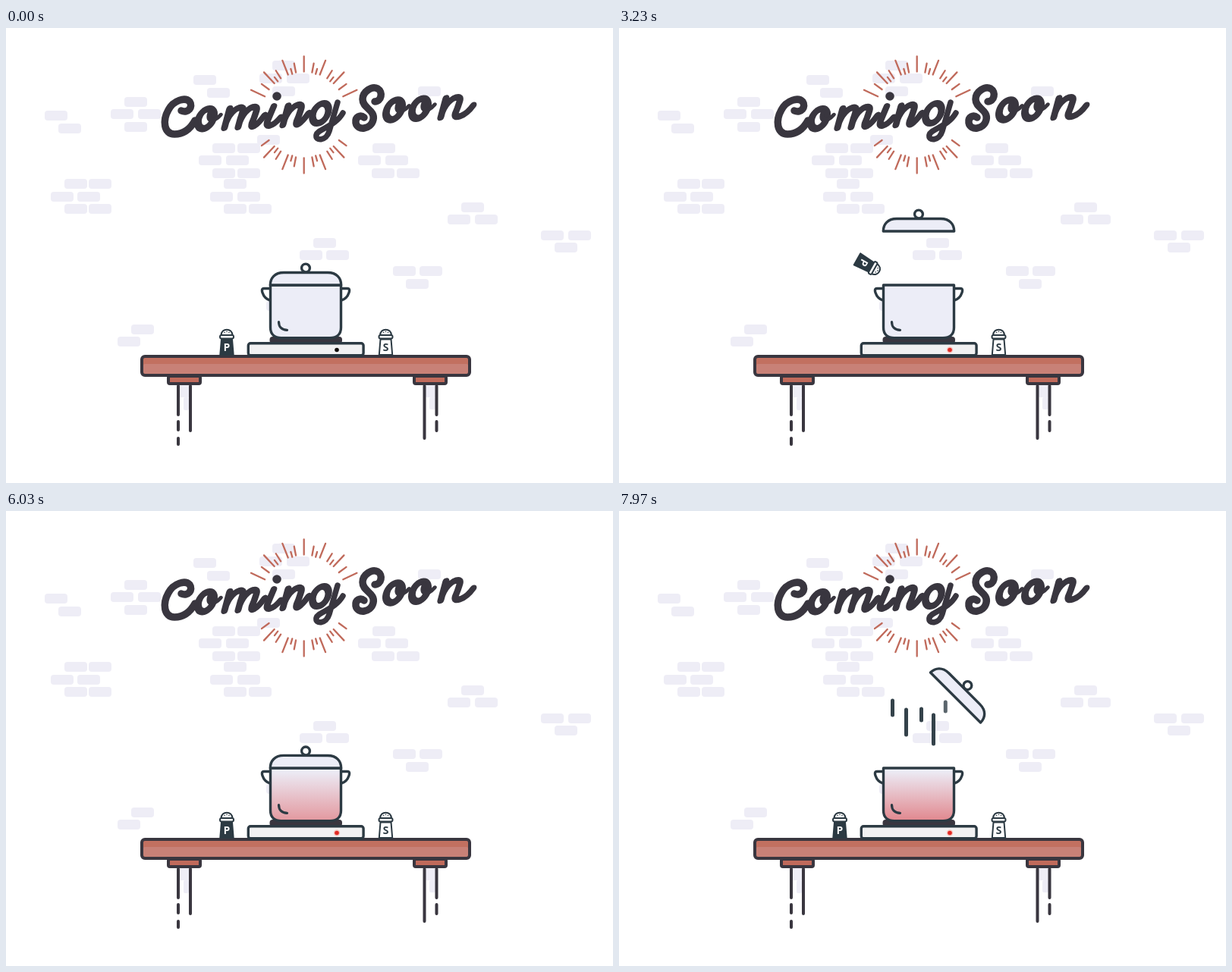
These frames come from a looping animation (800x600 px, 8 s). An HTML page with a canvas:

```html
<!DOCTYPE html>
<html lang="en">
<head>
<meta charset="utf-8">
<title>Coming Soon</title>
<style>
  html, body { margin: 0; width: 100%; height: 100%; overflow: hidden; background: #fff; }
  canvas { display: block; width: 800px; height: 600px; }
</style>
</head>
<body>
<canvas id="stage" width="800" height="600" role="img" aria-label="Coming Soon"></canvas>
<script>
const ctx = document.getElementById('stage').getContext('2d');
const LOOP = 8000;
const INK = '#2c3a43', DARK = '#39363f', METAL = '#ecedf7', RUST = '#c06a5b', BRICK = '#eeedf6';

// x, y of the top left corner of each brick
const bricks = [
  [51, 109], [69, 126], [156, 91], [138, 107], [174, 107], [156, 124],
  [247, 62], [265, 79], [351, 43], [334, 60], [370, 60], [351, 77], [543, 77], [331, 141],
  [272, 152], [305, 152], [254, 168], [290, 168], [272, 185], [305, 185],
  [287, 199], [269, 216], [305, 216], [287, 232], [320, 232],
  [483, 152], [464, 168], [500, 168], [482, 185], [515, 185],
  [77, 199], [109, 199], [59, 216], [94, 216], [77, 232], [109, 232],
  [600, 230], [582, 246], [618, 246], [705, 267], [741, 267], [723, 283],
  [405, 277], [387, 293], [422, 293], [510, 314], [545, 314], [527, 331],
  [165, 391], [147, 407], [343, 360]
];

const clamp = v => Math.max(0, Math.min(1, v));
const span = (t, start, length) => clamp((t - start) / length);
const easeOut = p => 1 - (1 - p) * (1 - p);

function box(x, y, w, h, r, fill, line, width) {
  ctx.beginPath();
  ctx.roundRect(x, y, w, h, r);
  if (fill) { ctx.fillStyle = fill; ctx.fill(); }
  if (line) { ctx.strokeStyle = line; ctx.lineWidth = width; ctx.stroke(); }
}

function path(d, line, width, fill) {
  const p = new Path2D(d);
  if (fill) { ctx.fillStyle = fill; ctx.fill(p); }
  if (line) { ctx.strokeStyle = line; ctx.lineWidth = width; ctx.stroke(p); }
}

function dot(x, y, r, fill, line, width) {
  ctx.beginPath();
  ctx.arc(x, y, r, 0, Math.PI * 2);
  if (fill) { ctx.fillStyle = fill; ctx.fill(); }
  if (line) { ctx.strokeStyle = line; ctx.lineWidth = width; ctx.stroke(); }
}

function ray(deg, r1, r2, side) {
  const a = deg * Math.PI / 180, sx = Math.sin(a), sy = Math.cos(a) * side;
  path(`M${392.7 + sx * r1} ${114.5 + sy * r1}L${392.7 + sx * r2} ${114.5 + sy * r2}`, RUST, 2.3);
}

function drawRays() {
  for (const side of [-1, 1]) {
    for (let i = -6; i <= 6; i++) {
      if (side > 0 && Math.abs(i) > 5) continue;
      ray(i * 10.8, 57, i % 2 ? 69 : 77, side);
    }
    for (const a of [-38, -16, 16, 38]) ray(a, 56, 63, side);
  }
}

// Slanted script letters; x is the position on the baseline
function letterO(x) {
  ctx.beginPath();
  ctx.ellipse(x, -13, 10, 13, 0, 0, Math.PI * 2);
  ctx.lineWidth = 9.5;
  ctx.stroke();
  path(`M${x + 3} -22C${x + 1} -10 ${x + 12} -7 ${x + 18} -17`, DARK, 6);
}

function arches(x, step, count, tail) {
  let d = `M${x} -25L${x} 0`;
  for (let i = 0; i < count; i++) {
    const a = x + i * step, b = a + step;
    d += `M${a} -6C${a + 2} -21 ${b - 7} -28 ${b - 2} -25C${b + 2} -23 ${b} -17 ${b} -12`;
    d += i < count - 1 ? `L${b} 0` : `L${b - 1} -5C${b - 1} 4 ${b + tail - 7} 1 ${b + tail} -14`;
  }
  path(d, DARK, 9);
}

function drawTitle() {
  ctx.strokeStyle = DARK;
  path('M231 109C240 113 247 104 242 97C236 91 221 95 214 108C206 122 208 140 222 140C235 140 243 133 249 122', DARK, 9.5);
  path('M486 97C495 97 497 84 490 80C482 76 470 84 470 94C470 106 487 108 484 121C481 134 463 136 461 125C460 117 467 114 472 118', DARK, 9.5);
  path('M437 98L426 136C422 150 407 149 409 141C411 133 434 130 444 112', DARK, 7.5);
  dot(357, 90, 5.8, DARK);
  ctx.save();
  ctx.transform(1, -0.0476, -0.27, 1, 0, 145.1);
  letterO(260);
  arches(288, 18, 2, 13);
  path('M346 -25L343 -6C343 3 352 2 359 -10', DARK, 9);
  arches(365, 18, 1, 12);
  ctx.beginPath();
  ctx.ellipse(411, -13, 10, 13, 0, 0, Math.PI * 2);
  ctx.lineWidth = 9;
  ctx.stroke();
  letterO(508);
  letterO(542);
  arches(573, 19, 1, 20);
  ctx.restore();
}

function drawTable() {
  for (const x of [214, 538]) box(x, 459, 42, 10, 2, RUST, DARK, 4);
  path('M227 472V510M227 519V530M227 541V549M243 472V531M551.5 472V541M567.5 472V510M567.5 519V531', DARK, 4);
  box(179, 433, 432, 25, 4, '#c27060');
  box(181, 443, 428, 13, 2, '#c88177');
  box(179, 433, 432, 25, 4, null, DARK, 4);
}

function drawStove(on) {
  box(347.5, 407, 95.5, 9, 4, DARK);
  box(319.3, 415.7, 151.8, 16, 3, '#f1f1f2', INK, 3.4);
  if (on > 0) dot(436, 424.5, 4.2, `rgba(250,160,150,${0.55 * on})`);
  dot(436, 424.5, 2.8, `rgb(${20 + 205 * on},${16 + 26 * on},${14 + 22 * on})`);
}

function drawPot(heat) {
  const body = 'M348.5 339H441.5V395C441.5 404 436 408.7 427 408.7H363C354 408.7 348.5 404 348.5 395Z';
  path('M348 343.5H340C337 343.5 337 346 338 349C340 355 344 358 348 359', INK, 3.4, '#fff');
  path('M442 343.5H450C453 343.5 453 346 452 349C450 355 446 358 442 359', INK, 3.4, '#fff');
  path(body, null, 0, METAL);
  const glow = ctx.createLinearGradient(0, 342, 0, 409);
  glow.addColorStop(0, 'rgba(224,126,132,0)');
  glow.addColorStop(1, `rgba(224,126,132,${0.92 * heat})`);
  path(body, INK, 3.4, glow);
  path('M359.5 387.5C359.5 394 363.5 398.3 370.5 398.3', INK, 3.2);
}

function drawLid(t) {
  let x = 0, y = -71 * (easeOut(span(t, 1030, 500)) - easeOut(span(t, 4530, 500))), turn = 0;
  if (t > 5430 && t < 7030) {
    const beat = (t - 5430) / 200, k = Math.sin(beat % 1 * Math.PI);
    y = -4 * k;
    turn = (Math.floor(beat) % 2 ? 2.3 : -2.3) * k;
  }
  const pop = easeOut(span(t, 7130, 600));
  x += 48.5 * pop;
  y -= 93 * pop;
  turn += 45 * pop;
  ctx.save();
  ctx.translate(395 + x, 339 + y);
  ctx.rotate(turn * Math.PI / 180);
  path('M-46.7 0C-46.7 -9 -41 -16.5 -29 -16.5H29C41 -16.5 46.7 -9 46.7 0Z', INK, 3.4, METAL);
  dot(0, -22.5, 5.4, '#fff', INK, 3.4);
  ctx.restore();
}

function drawSteam(t) {
  const p = span(t, 7370, 600);
  if (!p) return;
  const rise = 85 * (1 - easeOut(p));
  const sticks = [[360.5, 250, 269], [378.5, 262, 295], [398.5, 261, 276], [414.5, 269, 307], [430.3, 252, 264]];
  ctx.save();
  ctx.beginPath();
  ctx.rect(346, 200, 98, 139);
  ctx.clip();
  sticks.forEach(([x, a, b], i) => {
    ctx.globalAlpha = (i === 4 ? 0.78 : 0.96) * clamp(p * 3);
    path(`M${x} ${a + rise}V${b + rise}`, INK, 5);
  });
  ctx.restore();
}

// Rises and tips over the pot, shakes, then goes home
function shakerPose(t, start, shake, back, sway, lift) {
  const drift = p => p - 2 * p * (1 - p) ** 3;
  const leaving = t >= back;
  const p = leaving ? 1 - span(t, back, 300) : span(t, start, 300);
  const k = leaving ? p * p : easeOut(p);
  const jolt = t > shake && !leaving ? Math.sin((t - shake) / (back - shake) * 3 * Math.PI) ** 2 : 0;
  return { x: 60 * drift(p) + sway * jolt, y: -114 * k - lift * jolt, turn: 134 * k };
}

function drawShaker(x, dir, letter, solid, pose) {
  ctx.save();
  ctx.translate(x + dir * pose.x, 414.5 + pose.y);
  ctx.rotate(dir * pose.turn * Math.PI / 180);
  path('M-7 -4H7L8.7 16.5H-8.7Z', INK, 2, solid ? INK : '#fff');
  path('M-7.5 -9C-7.5 -19.5 7.5 -19.5 7.5 -9Z', INK, 2, '#fff');
  box(-9, -9.6, 18, 4.6, 2, '#fff', INK, 2);
  for (const [a, b] of [[-3, -13], [0, -14.3], [3, -13]]) dot(a, b, 0.8, INK);
  ctx.fillStyle = solid ? '#fff' : INK;
  ctx.font = 'bold 14px "Noto Sans Mono", "DejaVu Sans Mono", monospace';
  ctx.textAlign = 'center';
  ctx.fillText(letter, 0, 11.5);
  ctx.restore();
}

function draw(t) {
  ctx.fillStyle = '#fff';
  ctx.fillRect(0, 0, 800, 600);
  ctx.lineCap = ctx.lineJoin = 'round';
  for (const [x, y] of bricks) box(x, y, 30, 13, 4, BRICK);
  box(228, 471, 15, 16, 2, BRICK);
  box(234, 487, 7, 17, 2, BRICK);
  box(553, 471, 14, 16, 2, BRICK);
  box(558, 487, 8, 16, 2, BRICK);
  drawRays();
  drawTitle();
  drawTable();
  drawStove(span(t, 100, 500));
  drawSteam(t);
  drawPot(easeOut(span(t, 5130, 1500)));
  drawLid(t);
  drawShaker(291, 1, 'P', true, shakerPose(t, 3030, 3500, 4103, 9, 5));
  drawShaker(500.5, -1, 'S', false, shakerPose(t, 1730, 2180, 2715, 13, 12));
}

function tick() {
  draw(performance.now() % LOOP);
  requestAnimationFrame(tick);
}
tick();
</script>
</body>
</html>
```
